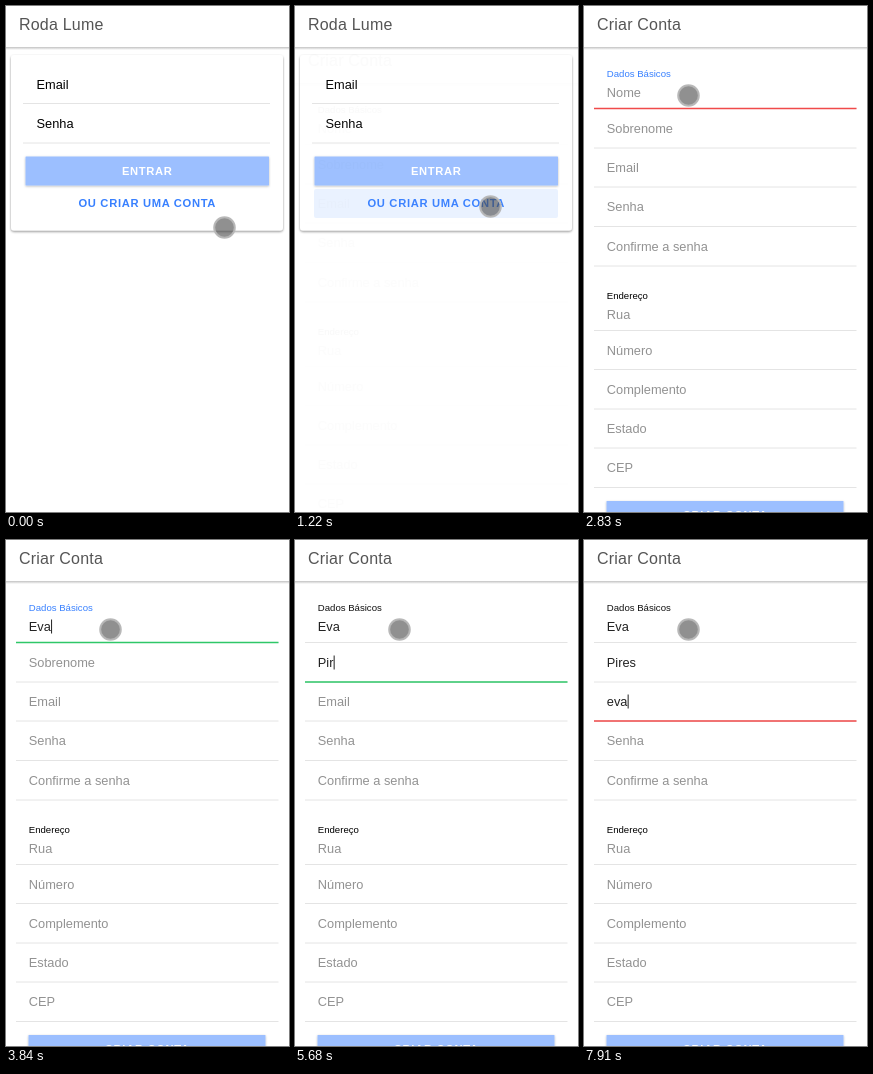
These frames come from a looping animation (283x506 px, 8000 ms). An HTML page:

```html
<!DOCTYPE html>
<html lang="pt">
<head>
<meta charset="utf-8">
<style>
  html, body { margin: 0; width: 100%; height: 100%; overflow: hidden; background: #fff; }
  svg { display: block; width: 100%; height: 100%; font: 12.8px "Liberation Sans", Arial, sans-serif; }
  text { white-space: pre; }
  .title { font-size: 16px; letter-spacing: .2px; fill: #555; }
  .small { font-size: 9.6px; }
  .button { font-size: 11.2px; font-weight: bold; letter-spacing: .672px; text-anchor: middle; }
  .hint { fill: #929292; }
  .value { fill: #222; }
  .rule { stroke: #e4e4e4; }
</style>
</head>
<body>
<svg viewBox="0 0 283 506">
  <defs>
    <linearGradient id="shade" x2="0" y2="1">
      <stop stop-color="#c2c2c2"/><stop offset="1" stop-color="#fff"/>
    </linearGradient>
    <filter id="lift" x="-10%" y="-10%" width="120%" height="130%">
      <feDropShadow dx="0" dy="1.2" stdDeviation="1.1" flood-opacity=".45"/>
    </filter>
    <filter id="softLift" x="-10%" y="-10%" width="120%" height="130%">
      <feDropShadow dx="0" dy=".8" stdDeviation=".8" flood-opacity=".28"/>
    </filter>
    <clipPath id="linkBox"><rect x="19" y="183" width="244" height="29" rx="2"/></clipPath>
  </defs>
  <g id="login"></g>
  <g id="signup"></g>
  <circle id="pointer" stroke-width="2"/>
</svg>
<script>
const LOOP = 8000;
const $ = id => document.getElementById(id);

function add(parent, tag, attrs, content = '') {
  const node = document.createElementNS('http://www.w3.org/2000/svg', tag);
  set(node, attrs);
  node.textContent = content;
  return parent.appendChild(node);
}
function set(node, attrs) {
  for (const key in attrs) node.setAttribute(key, attrs[key]);
}
const text = (parent, x, y, content, cls = '', attrs = {}) =>
  add(parent, 'text', { x, y, class: cls, ...attrs }, content);
const rule = (parent, x1, x2, y) =>
  add(parent, 'line', { x1, x2, y1: y, y2: y, class: 'rule' });

function header(parent, title) {
  add(parent, 'rect', { width: 283, height: 546, fill: '#fff' });
  add(parent, 'rect', { y: 41, width: 283, height: 3, fill: 'url(#shade)' });
  text(parent, 13, 24, title, 'title');
}
function solidButton(parent, x, y, width, label, baseline) {
  add(parent, 'rect', { x, y, width, height: 29, rx: .5, fill: '#9cbfff', filter: 'url(#softLift)' });
  text(parent, 141.3, baseline, label, 'button', { fill: '#fff' });
}

// Login page
const login = $('login');
header(login, 'Roda Lume');
add(login, 'rect', { x: 5, y: 49, width: 272, height: 175.5, rx: 3, fill: '#fff', filter: 'url(#lift)' });
text(login, 30.5, 83, 'Email');
text(login, 30.5, 122, 'Senha');
rule(login, 17, 264, 97.5);
rule(login, 17, 264, 137);
solidButton(login, 19.5, 150.5, 243.5, 'ENTRAR', 169);
const ripple = add(login, 'circle', { cx: 195, cy: 200, fill: '#3880ff', opacity: .1, 'clip-path': 'url(#linkBox)' });
text(login, 141.3, 201, 'OU CRIAR UMA CONTA', 'button', { fill: '#3880ff' });

// Sign-up page
const signup = $('signup');
header(signup, 'Criar Conta');
const sectionLabel = text(signup, 22.8, 71, 'Dados Básicos', 'small');
text(signup, 22.8, 292.5, 'Endereço', 'small');
const rows = [
  ['Nome', 91, 102.5], ['Sobrenome', 127, 142], ['Email', 166, 181],
  ['Senha', 205, 220.5], ['Confirme a senha', 244.5, 260], ['Rua', 312.5, 324.5],
  ['Número', 348.5, 363.5], ['Complemento', 388, 403], ['Estado', 427, 442], ['CEP', 466, 481.5]
].map(([hint, baseline, bottom]) => {
  const back = add(signup, 'rect', { x: 10, y: bottom - 39, width: 262.5, height: 39, fill: '#e0e0e0', opacity: 0 });
  rule(signup, 10, 272.5, bottom);
  return { hint, baseline, bottom, back, label: text(signup, 22.8, baseline, hint, 'hint') };
});
solidButton(signup, 22.5, 495, 237, 'CRIAR CONTA', 512.5);
const underline = add(signup, 'line', { x1: 10, x2: 272.5 });
const caret = add(signup, 'rect', { width: 1, height: 14, fill: '#222' });

// keys: [time, characters typed]; shade: [time, background opacity]
const entries = [
  { start: 2430, caretOff: 2830, value: 'Eva', valid: true,
    keys: [[3230, 1], [3640, 2], [3840, 3]], shade: [] },
  { start: 4260, caretOff: 4860, value: 'Pires', valid: true,
    keys: [[5070, 1], [5470, 2], [5680, 3], [6100, 5]],
    shade: [[4260, .5], [4460, 1], [5070, .45], [5270, 0]] },
  { start: 6700, caretOff: 7300, value: 'eva', valid: false,
    keys: [[7710, 2], [7910, 3]],
    shade: [[6700, .5], [6900, 1], [7710, .45], [7910, 0]] }
];
// time, x, y, pressed
const pointerSteps = [
  [0, 218.5, 221.5, 0], [200, 212, 216, 0], [400, 203, 207, 0], [610, 195.5, 200.5, 0],
  [810, 195.5, 200.5, 1], [1010, 195.5, 200.5, 0], [1820, 178, 180, 0],
  [2020, 125, 115, 0], [2230, 104.5, 89.5, 1], [2430, 104.5, 89.5, 0]
];
// time, opacity, vertical offset
const pageSteps = [[0, 0, 40], [1220, .02, 36], [1420, .7, 8], [1620, 1, 0]];
const rippleSteps = [[0, 0], [1010, 70], [1220, 190]];

const held = (steps, t, before = [0, 0]) =>
  steps.reduce((last, step) => step[0] <= t ? step : last, before);

function drawForm(t) {
  const active = entries.findLastIndex(entry => t >= entry.start);
  entries.forEach((entry, i) => {
    const { label, back, hint, baseline, bottom } = rows[i];
    const typed = held(entry.keys, t)[1];
    const shade = held(entry.shade, t)[1];
    label.textContent = typed ? entry.value.slice(0, typed) : hint;
    label.setAttribute('class', typed ? 'value' : 'hint');
    back.setAttribute('opacity', shade);
    if (i !== active) return;
    set(underline, { y1: bottom, y2: bottom, 'stroke-width': shade ? 1.2 : 1.6,
      stroke: typed && entry.valid ? '#2fc768' : '#f04a4a' });
    set(caret, { x: 22.5 + (typed ? label.getComputedTextLength() + .5 : 0), y: baseline - 11.5,
      opacity: typed || t < entry.caretOff ? 1 : 0 });
  });
  if (active < 0) {
    caret.setAttribute('opacity', 0);
    underline.setAttribute('stroke', 'none');
  }
  sectionLabel.setAttribute('fill', active === 0 ? '#3880ff' : '#111');
}

function draw(t) {
  const [, opacity, offset] = held(pageSteps, t);
  set(signup, { opacity, transform: `translate(0 ${offset})` });
  ripple.setAttribute('r', held(rippleSteps, t)[1]);
  drawForm(t);
  const [, cx, cy, pressed] = held(pointerSteps, t);
  set($('pointer'), { cx, cy,
    r: pressed ? 11 : 10.3,
    fill: pressed ? 'rgba(184,184,24,.8)' : 'rgba(70,70,70,.6)',
    stroke: pressed ? 'rgba(214,214,80,.95)' : 'rgba(182,182,182,.95)' });
}

function tick(now) {
  draw(now % LOOP);
  requestAnimationFrame(tick);
}
draw(0);
requestAnimationFrame(tick);
</script>
</body>
</html>
```
